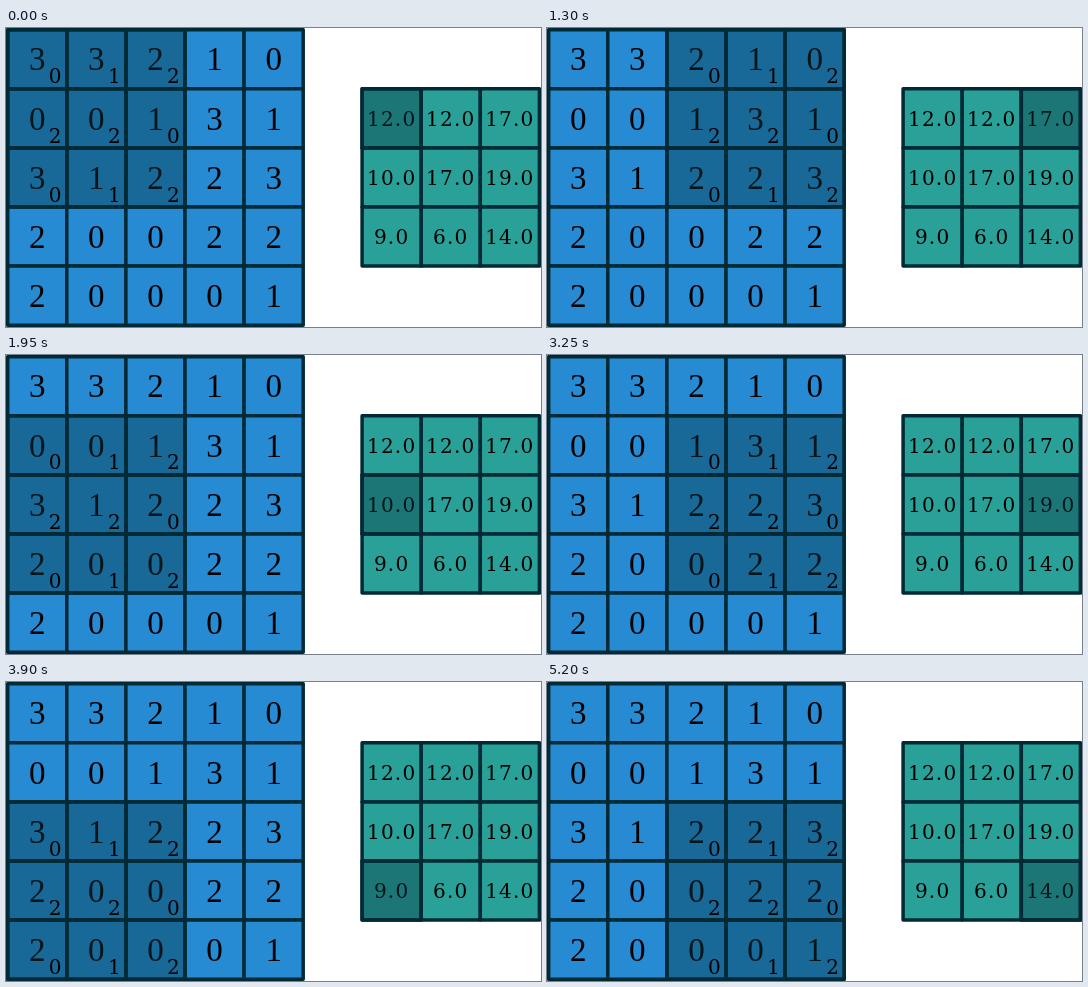
Write an HTML page that moves like this. It is 535 px wide and 299 px high and loops after 5850 ms.

```html
<!DOCTYPE html>
<html lang="en">
<head>
<meta charset="utf-8">
<title>Convolution</title>
<style>
  html, body { margin: 0; width: 100%; height: 100%; overflow: hidden; background: #fff; }
  svg { display: block; width: 535px; height: 299px; }
  rect { stroke: #002b36; stroke-width: 3.5; stroke-linejoin: round; }
  text { text-anchor: middle; }
  .input { font: 33px "Liberation Serif", serif; }
  .weight { font: 20px "DejaVu Serif", serif; }
  .output { font: 20px "DejaVu Serif", serif; letter-spacing: 1.2px; }
  .shade { fill: #073642; fill-opacity: .4; }
</style>
</head>
<body>
<svg id="stage" viewBox="0 0 535 299"></svg>
<script>
const CELL = 59.1, STEP_MS = 650;
const INPUT_X = 1.7, INPUT_Y = 1.7, OUTPUT_X = 356.1, OUTPUT_Y = 60.8;
const input = ["33210", "00131", "31223", "20022", "20001"].map(row => [...row].map(Number));
const kernel = [[0, 1, 2], [2, 2, 0], [0, 1, 2]];
const positions = [0, 1, 2];

// Each output cell is the kernel-weighted sum of the window below it.
const output = positions.map(row => positions.map(col =>
  kernel.flatMap((weights, r) => weights.map((w, c) => w * input[row + r][col + c]))
    .reduce((sum, value) => sum + value).toFixed(1)));

const stage = document.getElementById("stage");

function add(parent, tag, attributes, content = "") {
  const node = document.createElementNS("http://www.w3.org/2000/svg", tag);
  for (const [key, value] of Object.entries(attributes)) node.setAttribute(key, value);
  node.textContent = content;
  return parent.appendChild(node);
}

function addGrid(values, x, y, fill, className, baseline) {
  values.forEach((row, r) => row.forEach((value, c) => {
    const left = x + c * CELL, top = y + r * CELL;
    add(stage, "rect", { x: left, y: top, width: CELL, height: CELL, fill });
    add(stage, "text", { x: left + CELL / 2, y: top + baseline, class: className }, value);
  }));
}

function addShade(parent, x, y) {
  return add(parent, "rect", { x, y, width: CELL, height: CELL, class: "shade" });
}

addGrid(input, INPUT_X, INPUT_Y, "#268bd2", "input", 40.7);
addGrid(output, OUTPUT_X, OUTPUT_Y, "#2aa198", "output", 36.7);

const kernelWindow = add(stage, "g", {});
kernel.forEach((row, r) => row.forEach((weight, c) => {
  const x = INPUT_X + c * CELL, y = INPUT_Y + r * CELL;
  addShade(kernelWindow, x, y);
  add(kernelWindow, "text", { x: x + 47.5, y: y + 53.7, class: "weight" }, weight);
}));
const outputShade = addShade(stage, OUTPUT_X, OUTPUT_Y);

function draw(now) {
  const step = Math.floor(now / STEP_MS) % 9;
  const shift = `translate(${step % 3 * CELL} ${Math.floor(step / 3) * CELL})`;
  kernelWindow.setAttribute("transform", shift);
  outputShade.setAttribute("transform", shift);
  requestAnimationFrame(draw);
}
draw(performance.now());
</script>
</body>
</html>
```
